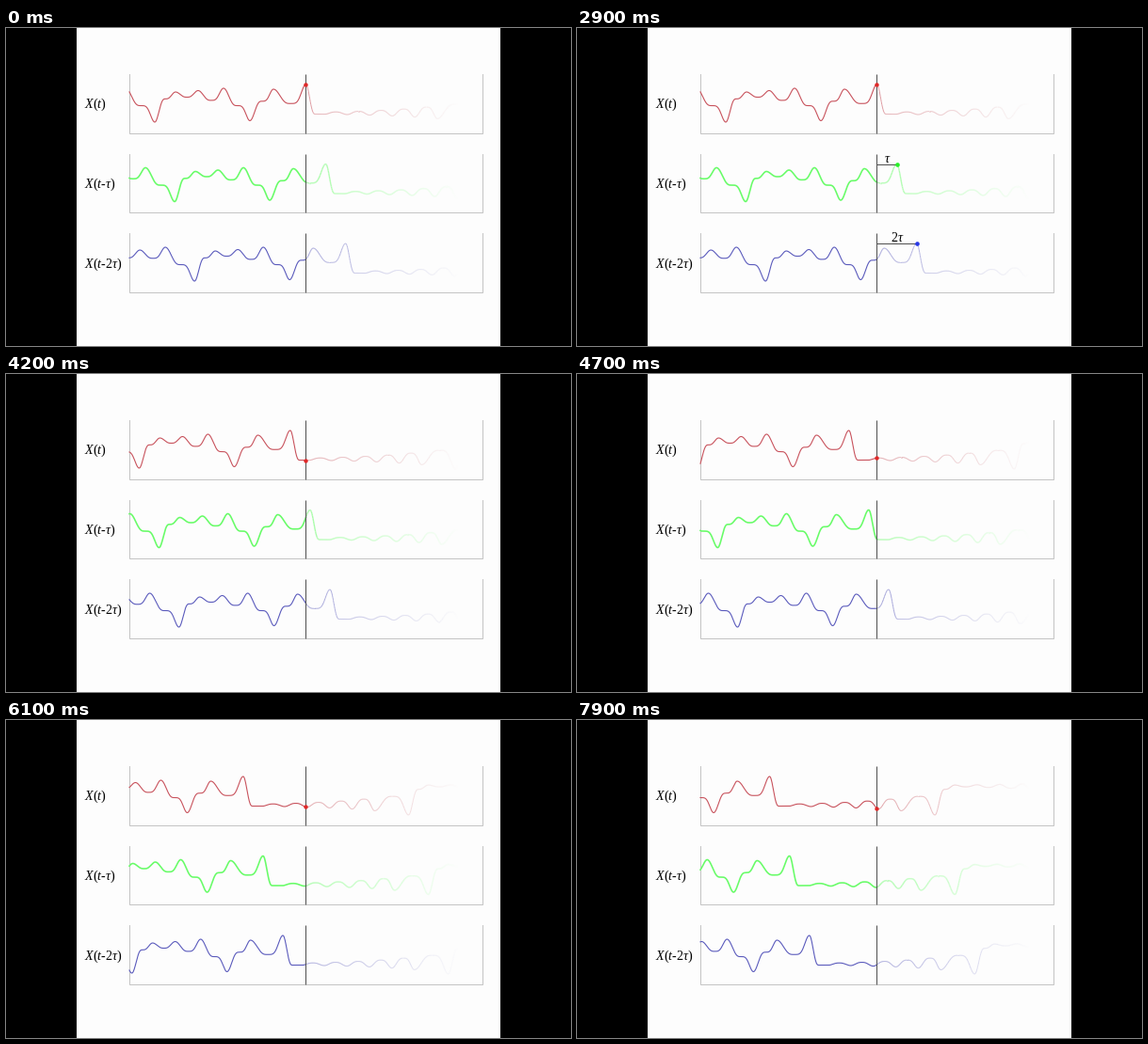
Recreate the animation shown at these times as a matplotlib script. Size 600 by 338 pixels, loop 8000 ms.

```python
import numpy as np
import matplotlib.pyplot as plt
from matplotlib.animation import FuncAnimation
from matplotlib.collections import LineCollection
from matplotlib.colors import to_rgb
from matplotlib.patches import Rectangle

W, H, DPI = 600, 338, 100
FRAMES, STEP = 80, 100
PX = 72 / DPI

plt.rcParams.update({
    "font.family": "Liberation Serif",
    "mathtext.fontset": "custom",
    "mathtext.it": "Liberation Serif:italic",
    "mathtext.rm": "Liberation Serif",
})

LEFT, NOW, RIGHT, FADE_END = 131, 318.4, 506, 480
LAG, ROW = 21.1, 84.5
SPEED, START = 2.63, 35.7
PAPER, INK = "#fdfdfd", "#505050"

# Heights the signal circles around: upper and lower wing of the attractor
UPPER, LOWER = 69.7, 90.7


def spiral(x, eye, amp, turns):
    """Crests of a swing that grows by a fixed ratio each turn."""
    return [(x + 23.9 * k, eye + amp * 1.45 ** k) for k in range(turns)]


CRESTS = np.array(
    [(74, 100), (100, 67), (127, 64), (158, 100), (180, 68), (204, 66.5),
     (231, 64), (259, 98.5), (284, 65), (NOW, 60)]
    + spiral(338.5, LOWER, 0.9, 6) + [(494, 101)] + spiral(515, UPPER, -0.6, 5))
CX, CY = CRESTS.T

# The rest level after a crest follows from how far the crest swung out
REST = np.where(CY < 80, UPPER + 2.25 * (UPPER - CY), LOWER - 1.65 * (CY - LOWER))


def signal(u):
    """Ease from each crest to a rest level halfway, then up a sharper crest."""
    i = np.searchsorted(CX, u, side="right") - 1
    s = 2 * (u - CX[i]) / (CX[i + 1] - CX[i])
    leaving = s < 1
    swing = np.where(leaving, CY[i], CY[i + 1]) - REST[i]
    power = np.where(leaving, 1.4, 1 + np.abs(swing) / 11)
    return REST[i] + swing * (np.cos(np.pi * s / 2) ** 2) ** power


def fade(f, start, end):
    return float(np.clip((f - start) / (end - start), 0, 1))


def blend(color, amount):
    """Mix a colour into the paper."""
    amount = np.asarray(amount)[:, None]
    return np.array(to_rgb(PAPER)) * (1 - amount) + np.array(to_rgb(color)) * amount


fig = plt.figure(figsize=(W / DPI, H / DPI), dpi=DPI, facecolor="black")
ax = fig.add_axes([0, 0, 1, 1])
ax.set(xlim=(0, W), ylim=(H, 0))
ax.axis("off")
ax.add_patch(Rectangle((75, 0), 450, H, fc=PAPER, ec="none"))

past_x = np.linspace(LEFT, NOW, 400)
future_x = np.linspace(NOW, FADE_END, 300)
strength = 0.6 * (1 - (future_x[:-1] - NOW) / (FADE_END - NOW))


class Row:
    def __init__(self, k, label, color, width):
        self.lag, self.dy = k * LAG, k * ROW
        top, base = 49 + self.dy, 111.9 + self.dy
        ax.plot([LEFT, LEFT, RIGHT, RIGHT], [top, base, base, top],
                color="#bebebe", lw=0.9 * PX, solid_joinstyle="miter")
        self.future = ax.add_collection(LineCollection(
            [], colors=blend(color, strength), linewidths=width * 0.85 * PX, zorder=3))
        self.past, = ax.plot([], [], color=color, lw=width * PX, zorder=3)
        ax.plot([NOW, NOW], [top, base], color=INK, lw=PX,
                solid_capstyle="butt", zorder=4)
        ax.text(83.3, 84.8 + 85 * k, label, size=14 * PX, va="baseline")

    def update(self, shift):
        def y(x):
            return signal(x + shift - self.lag) + self.dy
        self.past.set_data(past_x, y(past_x))
        pts = np.column_stack([future_x, y(future_x)])
        self.future.set_segments(np.stack([pts[:-1], pts[1:]], axis=1))


class Marker:
    """Delay bar with its caption and end dot."""

    def __init__(self, k, caption, color, start):
        x, y = NOW + k * LAG, 60.2 + k * ROW
        self.start = start
        bar, = ax.plot([NOW, x], [y, y], color=INK, lw=PX, zorder=4)
        dot, = ax.plot([x], [y], "o", color=color, ms=4.6 * PX, mew=0, zorder=5)
        text = ax.text((NOW + x) / 2 + 0.5, y - 1.8, caption, size=14 * PX,
                       ha="center", va="baseline", zorder=5)
        self.parts = bar, dot, text

    def update(self, f):
        alpha = fade(f, self.start, self.start + 3) * (1 - fade(f, 32, 35))
        for part in self.parts:
            part.set_alpha(alpha)


rows = [
    Row(0, "$X$($t$)", "#c8525c", 1.1),
    Row(1, r"$X$($t$-$\tau$)", "#68fc68", 1.6),
    Row(2, r"$X$($t$-2$\tau$)", "#5a5abc", 1.1),
]
markers = [
    Marker(1, r"$\tau$", "#28f028", 4),
    Marker(2, r"2$\tau$", "#2838e6", 8),
]
now_dot, = ax.plot([], [], "o", color="#e02828", ms=4.4 * PX, mew=0, zorder=6)


def draw(f):
    shift = SPEED * max(0, f - START)
    for row in rows:
        row.update(shift)
    for marker in markers:
        marker.update(f)
    now_dot.set_data([NOW], signal(np.array([NOW + shift])))


anim = FuncAnimation(fig, draw, frames=FRAMES, interval=STEP, repeat=True, repeat_delay=0)
plt.show()
```
